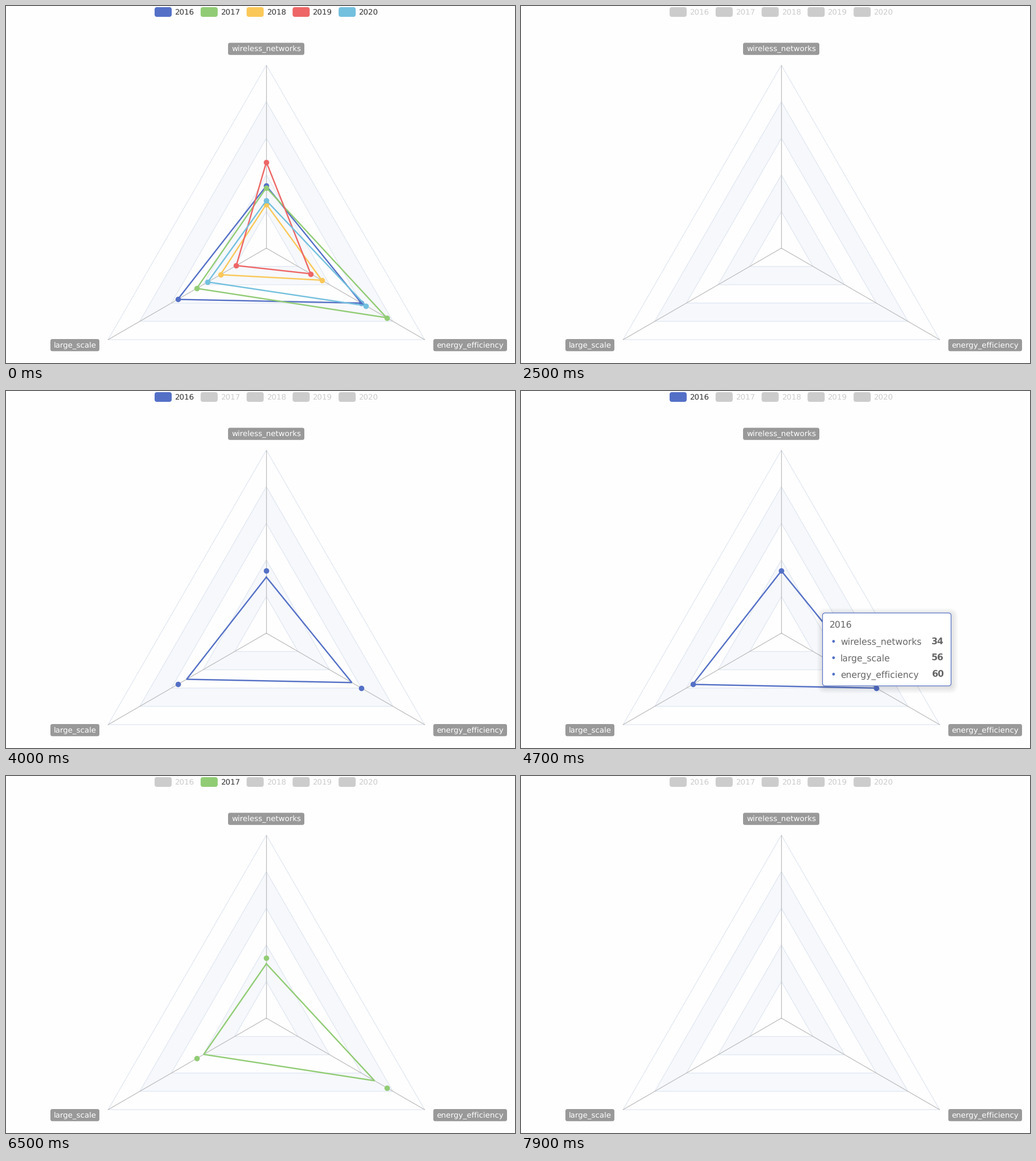
These frames come from a looping animation (894 px wide and 626 px high, 8 s). A matplotlib script:

```python
import numpy as np
import matplotlib.pyplot as plt
from matplotlib.animation import FuncAnimation
from matplotlib.patches import Circle, FancyBboxPatch, Polygon

W, H, DPI = 894, 626, 100
PX = 72 / DPI  # points per pixel
STEP, LOOP = 100, 8000

plt.rcParams["font.family"] = "DejaVu Sans"
plt.rcParams["text.hinting"] = "none"

CENTER = np.array([457.3, 424.6])
RADIUS = 321
ANGLES = np.radians([90, 210, 330])
DIRS = np.column_stack([np.cos(ANGLES), -np.sin(ANGLES)])
AXES = ["wireless_networks", "large_scale", "energy_efficiency"]

# name, colour, values, visible spans in ms
SERIES = [
    ("2016", "#5470c6", (34, 56, 60), [(0, 1300), (3400, 5500)]),
    ("2017", "#91cc75", (33, 44, 76), [(0, 1500), (5900, 7800)]),
    ("2018", "#fac858", (24, 29, 35), [(0, 1800)]),
    ("2019", "#ee6666", (47, 19, 28), [(0, 2100)]),
    ("2020", "#73c0de", (26, 37, 63), [(0, 2400)]),
]
GROW_DELAY, GROW_TIME = 64, 1000
HIGHLIGHT = (500, 800)  # first series is raised above the others

# series, start, fade-out start, end, left, top, vertical drift
TIPS = [
    (0, 4500, 5100, 5300, 529, 389, -3),
    (1, 7000, 7400, 7600, 518, 380, -5),
]
TIP_W, TIP_H, TIP_ROW = 227, 129, 28.8
TEXT, TIP_TEXT = 13.35, 15.6

fig = plt.figure(figsize=(W / DPI, H / DPI), dpi=DPI, facecolor="#fefefe")
ax = fig.add_axes([0, 0, 1, 1])
ax.set_xlim(0, W)
ax.set_ylim(H, 0)
ax.axis("off")


def round_box(x, y, w, h, r, fc, ec="none", lw=0, **kw):
    box = FancyBboxPatch((x, y), w, h, fc=fc, ec=ec, lw=lw * PX,
                         boxstyle=f"round,pad=0,rounding_size={r}", **kw)
    return ax.add_patch(box)


def label(x, y, text, size=TEXT, color="#333", **kw):
    return ax.text(x, y, text, fontsize=size * PX, color=color,
                   va="baseline", **kw)


def ring(fractions):
    return CENTER + DIRS * RADIUS * np.reshape(fractions, (-1, 1))


def draw_grid():
    bands = ["#fefefe", "#f6f8fc"]
    for level in range(5, 0, -1):
        ax.add_patch(Polygon(ring([level / 5] * 3), fc=bands[(level - 1) % 2],
                             ec="#e0e6f1", lw=1.2 * PX, zorder=1))
    for tip in ring([1] * 3):
        ax.plot(*zip(CENTER, tip), color="#bbb", lw=1.2 * PX, zorder=2)
    boxes = [(390, 64.5, 134), (78, 584, 86), (750.5, 584, 129.5)]
    for (x, y, w), name in zip(boxes, AXES):
        round_box(x, y, w, 21.3, 3.6, "#999", zorder=2)
        label(x + w / 2, y + 14.7, name, color="white", ha="center", zorder=3)


def make_series(i, name, color):
    x = 261 + 80.8 * i
    icon = round_box(x, 2, 30, 17, 4.2, color)
    text = label(x + 35, 14.4, name)
    line, = ax.plot([], [], color=color, lw=2.4 * PX,
                    solid_joinstyle="bevel")
    dots, = ax.plot([], [], "o", color=color, ms=9.6 * PX, mew=0)
    return icon, text, line, dots


def growth(t, start):
    if start == 0:
        return 1
    u = np.clip((t - start - GROW_DELAY) / GROW_TIME, 0, 1)
    return 1 - (1 - u) ** 3


def update_series(i, t):
    _, color, values, spans = SERIES[i]
    icon, text, line, dots = artists[i]
    start = next((a for a, b in spans if a <= t < b), None)
    shown = start is not None
    icon.set_facecolor(color if shown else "#ccc")
    text.set_color("#333" if shown else "#ccc")
    line.set_visible(shown)
    dots.set_visible(shown)
    if not shown:
        return
    part = np.array(values) / 100
    dots.set_data(*ring(part).T)
    line.set_data(*ring(np.append(part, part[0]) * growth(t, start)).T
                  if False else closed(part * growth(t, start)))
    raised = i == 0 and HIGHLIGHT[0] <= t < HIGHLIGHT[1]
    z = 20 if raised else 10 + i
    line.set_zorder(z)
    dots.set_zorder(z + 0.5)


def closed(part):
    points = ring(part)
    return np.vstack([points, points[:1]]).T


def draw_tip(i, x, y, alpha):
    name, color, values, _ = SERIES[i]
    kw = dict(alpha=alpha, zorder=30)
    parts = []
    for grow in np.arange(10, -1, -2):
        parts.append(round_box(x + 1.2 - grow, y + 2.4 - grow,
                               TIP_W + 2 * grow, TIP_H + 2 * grow, 5 + grow,
                               "black", alpha=0.02 * alpha, zorder=29))
    parts.append(round_box(x + 0.6, y + 0.6, TIP_W - 1.2, TIP_H - 1.2, 4.8,
                           "white", color, 1.2, **kw))
    base = y + 27
    parts.append(label(x + 13, base, name, TIP_TEXT, "#666", **kw))
    for axis, value in zip(AXES, values):
        base += TIP_ROW
        parts.append(ax.add_patch(Circle((x + 20, base - 5.5), 2.4, fc=color,
                                         ec="none", **kw)))
        parts.append(label(x + 32, base, axis, TIP_TEXT, "#666", **kw))
        parts.append(label(x + TIP_W - 13, base, str(value), TIP_TEXT, "#666",
                           ha="right", weight="bold", **kw))
    return parts


def update_tips(t):
    while tip_parts:
        tip_parts.pop().remove()
    for i, start, fade, end, x, y, drift in TIPS:
        if not start <= t < end:
            continue
        fade_in = 1 - (1 - min((t - start + 40) / 240, 1)) ** 3
        fade_out = np.clip((end - t - 30) / (end - fade + 70), 0, 1)
        alpha = fade_in if t < fade else fade_out
        rest = (1 - min((t - start) / 400, 1)) ** 3
        tip_parts.extend(draw_tip(i, x, y + drift * rest, alpha))


def update(frame):
    t = frame * STEP
    for i in range(len(SERIES)):
        update_series(i, t)
    update_tips(t)
    return []


draw_grid()
artists = [make_series(i, s[0], s[1]) for i, s in enumerate(SERIES)]
tip_parts = []

anim = FuncAnimation(fig, update, frames=LOOP // STEP, interval=STEP,
                     init_func=lambda: [], repeat=True, repeat_delay=0,
                     blit=False)
plt.show()
```
